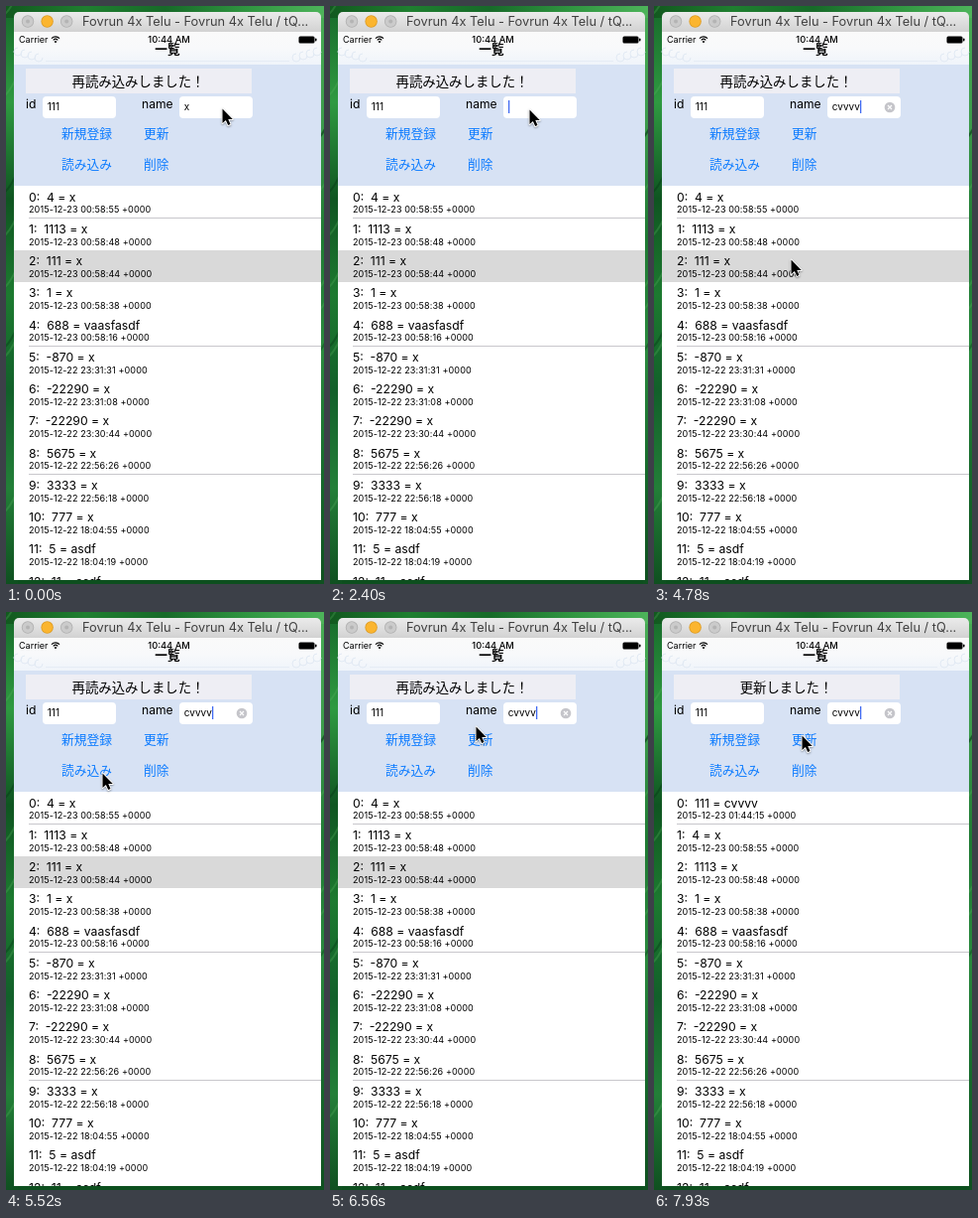
Animation, 321 px wide and 582 px high, one loop 8000 ms. Source, as an HTML page with a canvas:

```html
<!DOCTYPE html>
<html lang="ja">
<head>
<meta charset="utf-8">
<title>一覧</title>
<style>
html, body { margin: 0; width: 100%; height: 100%; overflow: hidden; background: #0c4a1b; }
canvas { display: block; width: 321px; height: 582px; }
</style>
</head>
<body>
<canvas id="stage"></canvas>
<script>
const W = 321, H = 582, LOOP = 8000;
const LATIN = 'Inter, Roboto, sans-serif';
const CJK = '"Noto Sans CJK JP", "Noto Sans CJK", sans-serif';
const BLUE = '#0a7aff';
const ROW_TOP = 181, ROW_H = 32.25;

const canvas = document.getElementById('stage');
const ctx = canvas.getContext('2d');
const dpr = window.devicePixelRatio || 1;
canvas.width = W * dpr;
canvas.height = H * dpr;

// Each row: value, day of December 2015, time
const oldRows = [
  ['4 = x', 23, '00:58:55'], ['1113 = x', 23, '00:58:48'],
  ['111 = x', 23, '00:58:44'], ['1 = x', 23, '00:58:38'],
  ['688 = vaasfasdf', 23, '00:58:16'], ['-870 = x', 22, '23:31:31'],
  ['-22290 = x', 22, '23:31:08'], ['-22290 = x', 22, '23:30:44'],
  ['5675 = x', 22, '22:56:26'], ['3333 = x', 22, '22:56:18'],
  ['777 = x', 22, '18:04:55'], ['5 = asdf', 22, '18:04:19'],
  ['11 = asdf', 22, '18:04:02']
];
const newRows = [['111 = cvvvv', 23, '01:44:15'], ...oldRows.filter((row, i) => i !== 2)];

// Pointer positions: time, x, y (no position = hidden)
const pointer = [
  [0, 218, 103], [1060, 216, 107], [1210, 213, 110],
  [1650, 212, 110], [1800, 209, 109], [1950, 206, 107], [2100, 203, 105], [2250, 201, 104],
  [4190, 199, 113], [4340, 189, 142], [4490, 167, 195], [4630, 147, 240],
  [4780, 138, 255], [4930, 135, 257], [5070, 130, 238], [5220, 125, 197],
  [5370, 108, 178], [5520, 97, 162], [5670, 99, 148], [5820, 115, 136],
  [5960, 132, 126], [6110, 144, 120], [6260, 151, 121], [6410],
  [6560, 147, 115], [6740], [7490, 149, 124]
];
const typed = [[0, 'x'], [2400, ''], [3150, 'c'], [3300, 'cv'], [3450, 'cvvv'], [3890, 'cvvvv']];
const updateAlpha = [[0, 1], [6740, 0.2], [7780, 0.6], [7930, 1]];

const at = (keys, t) => keys.filter(k => k[0] <= t).pop();

function rect(x, y, w, h, fill, r = 0) {
  ctx.fillStyle = fill;
  ctx.beginPath();
  ctx.roundRect(x, y, w, h, r);
  ctx.fill();
}

function disc(x, y, r, fill) {
  ctx.fillStyle = fill;
  ctx.beginPath();
  ctx.arc(x, y, r, 0, Math.PI * 2);
  ctx.fill();
}

function text(str, x, y, size, { family = LATIN, color = '#000', weight = 400, align = 'left' } = {}) {
  ctx.font = `${weight} ${size}px ${family}`;
  ctx.fillStyle = color;
  ctx.textAlign = align;
  ctx.fillText(str, x, y);
}

function gradient(x1, y1, colors, x0 = 0, y0 = 0) {
  const g = ctx.createLinearGradient(x0, y0, x1, y1);
  colors.forEach((c, i) => g.addColorStop(i / (colors.length - 1), c));
  return g;
}

const vertical = (y0, y1, ...colors) => gradient(0, y1, colors, 0, y0);

function drawLeaves() {
  rect(0, 0, W, H, '#0d4f1e');
  rect(0, 0, 12, H, vertical(0, H, '#16692a', '#2f9a41', '#0f5521', '#1d7a30', '#12602a', '#237f38', '#0f5020'));
  rect(316, 0, 5, H, vertical(0, H, '#48ad55', '#3c9b4b', '#1f7a33', '#2a8a3e', '#176b2c', '#0f5020'));
  rect(0, 0, W, 12, gradient(W, 0, ['#12591f', '#1f7f30', '#176a29', '#2f9440', '#4db45a']));
  let seed = 11;
  const rnd = () => (seed = seed * 16807 % 2147483647) / 2147483647;
  ctx.lineWidth = 2;
  for (let i = 0; i < 16; i++) {
    const x = 4 + (i % 2) * 315, y = rnd() * H;
    ctx.strokeStyle = rnd() < 0.6 ? 'rgba(90,180,95,.3)' : 'rgba(3,45,16,.35)';
    ctx.beginPath();
    ctx.moveTo(x - 6, y + 9);
    ctx.quadraticCurveTo(x, y + 4, x + 6, y - 9);
    ctx.stroke();
  }
}

function drawTitleBar() {
  rect(8, 6, 310, 24, vertical(6, 26, '#ebebeb', '#d2d2d2'), [5, 5, 0, 0]);
  [['#b0b0b0', '#cbcbcb', '#b4b4b4'], ['#dd9b22', '#fbb52f'], ['#b0b0b0', '#cbcbcb', '#b4b4b4']]
    .forEach(([edge, fill, mark], i) => {
      const x = 22 + i * 19.6;
      disc(x, 15.5, 6.2, edge);
      disc(x, 15.5, 5.4, fill);
      if (mark) disc(x, 15.5, 2, mark);
    });
  text('Fovrun 4x Telu - Fovrun 4x Telu / tQ...', 77, 20, 12.8, { color: '#404040' });
}

function drawStatusBar() {
  rect(8, 26, 310, 33, vertical(26, 59, '#fafafa', '#f8f9fb', '#eff4fa'));
  // Faint lace along the lower edge
  ctx.strokeStyle = '#e2eaf4';
  ctx.lineWidth = 1;
  for (let i = 0; i < 4; i++) {
    for (const x of [12 + i * 7, 314 - i * 7]) {
      ctx.beginPath();
      ctx.arc(x, 52 - (3 - i) * 2, 4, 0, Math.PI * 1.5);
      ctx.stroke();
    }
  }
  rect(40, 55, 246, 1, '#e5ecf5');

  text('Carrier', 13, 37, 9);
  ctx.strokeStyle = '#000';
  ctx.lineWidth = 1.2;
  for (const r of [3.2, 5.7]) {
    ctx.beginPath();
    ctx.arc(50, 36.6, r, -Math.PI * 0.75, -Math.PI * 0.25);
    ctx.stroke();
  }
  disc(50, 36, 1.1, '#000');
  text('10:44 AM', 164.5, 37, 9.3, { weight: 500, align: 'center' });
  rect(295.5, 30.5, 16, 7, '#000', 1.5);
  rect(312, 32.5, 1.5, 3, '#000', 0.7);
  text('一覧', 163, 47.5, 12.7, { family: CJK, weight: 700, align: 'center' });
}

function drawField(x, value, caret) {
  rect(x, 91, 74, 22, '#fff', 4);
  text(value, x + 4.8, 105.3, 10);
  if (!caret) return;
  rect(x + 5 + ctx.measureText(value).width, 95, 1.3, 13, '#426bf2');
  if (!value) return;
  disc(238, 102, 5.3, '#c5c5ca');
  ctx.strokeStyle = '#fff';
  ctx.lineWidth = 1.1;
  ctx.beginPath();
  for (const d of [-2, 2]) {
    ctx.moveTo(238 - 2, 102 - d);
    ctx.lineTo(238 + 2, 102 + d);
  }
  ctx.stroke();
}

function button(label, x, y, alpha = 1) {
  ctx.globalAlpha = alpha;
  text(label, x, y, 12.75, { family: CJK, color: BLUE });
  ctx.globalAlpha = 1;
}

function drawForm(t, saved) {
  rect(8, 59, 310, 122, '#d7e2f4');
  rect(20, 63, 228, 25, '#eeeef4');
  text(saved ? '更新しました！' : '再読み込みしました！', 133.5, 80.5, 13.4, { family: CJK, align: 'center' });
  text('id', 20, 102.5, 12.2);
  text('name', 137, 102.5, 12.1);
  drawField(37, '111', false);
  drawField(175, at(typed, t)[1], t >= 2400);
  button('新規登録', 56, 133);
  button('更新', 139, 133, at(updateAlpha, t)[1]);
  button('読み込み', 56, 164);
  button('削除', 139, 164);
}

function drawTable(saved) {
  rect(8, ROW_TOP, 310, 578 - ROW_TOP, '#fff');
  ctx.save();
  ctx.beginPath();
  ctx.rect(8, ROW_TOP, 310, 578 - ROW_TOP);
  ctx.clip();
  if (!saved) rect(8, 246, 310, 32, '#d9d9d9');
  (saved ? newRows : oldRows).forEach(([value, day, time], i) => {
    const y = ROW_TOP + i * ROW_H;
    text(`${i}:  ${value}`, 23, y + 15.7, 12.2);
    ctx.letterSpacing = '0.1px';
    text(`2015-12-${day} ${time} +0000`, 23, y + 27.3, 9.05);
    ctx.letterSpacing = '0px';
    if (i % 4 === 0) rect(23, Math.floor(y + ROW_H), 295, 1, '#c8c7cc');
  });
  ctx.restore();
}

function drawPointer(x, y) {
  const arrow = new Path2D('M0 0V14.6L3.4 11.4L5.7 16.6L8 15.6L5.8 10.5H10.3Z');
  ctx.save();
  ctx.translate(x + 0.5, y + 0.5);
  ctx.lineJoin = 'round';
  ctx.shadowColor = 'rgba(0,0,0,.35)';
  ctx.shadowBlur = 2;
  ctx.shadowOffsetY = 1;
  ctx.strokeStyle = '#fff';
  ctx.lineWidth = 1.8;
  ctx.stroke(arrow);
  ctx.shadowColor = 'transparent';
  ctx.fillStyle = '#000';
  ctx.fill(arrow);
  ctx.restore();
}

function draw(t) {
  const saved = t >= 7780;
  ctx.setTransform(dpr, 0, 0, dpr, 0, 0);
  drawLeaves();
  drawTitleBar();
  drawStatusBar();
  drawForm(t, saved);
  drawTable(saved);
  const [, x, y] = at(pointer, t);
  if (x !== undefined) drawPointer(x, y);
}

const start = performance.now();
function tick() {
  draw((performance.now() - start) % LOOP);
  requestAnimationFrame(tick);
}
tick();
</script>
</body>
</html>
```
